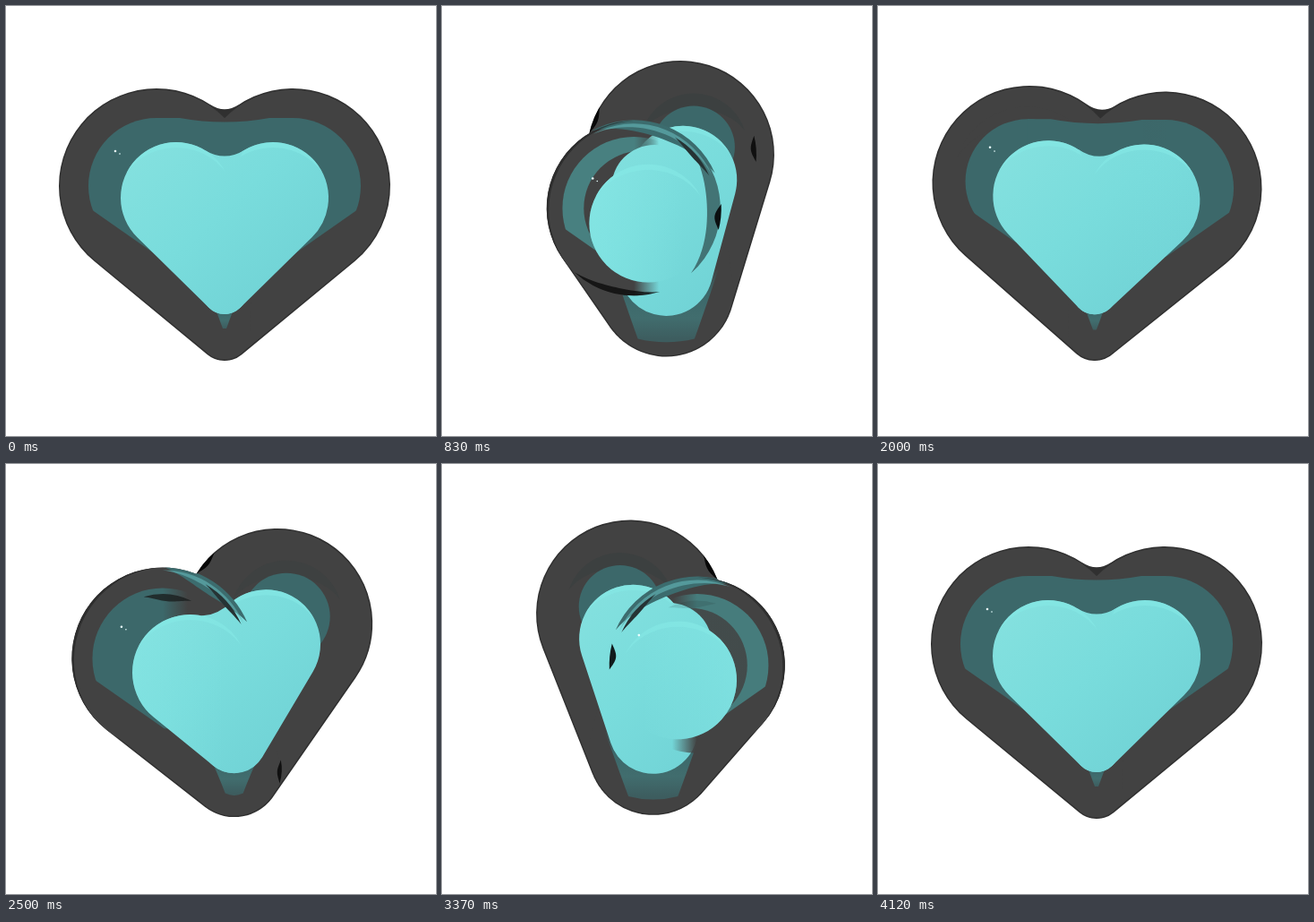
Animation, 480 px wide and 480 px high, one loop 4220 ms. Source, as an HTML page with a canvas:

```html
<!DOCTYPE html>
<html lang="en">
<head>
<meta charset="utf-8">
<title>Turning glass heart</title>
<style>
html, body { margin: 0; width: 100%; height: 100%; overflow: hidden; background: #fff; }
canvas { display: block; width: 480px; height: 480px; }
</style>
</head>
<body>
<canvas id="stage" width="480" height="480"></canvas>
<script>
const ctx = document.getElementById('stage').getContext('2d');
const LOOP = 4220, STEPS = 99, MID = 244, TAU = Math.PI * 2;
const SHELL = '66,66,66', TEAL = '60,104,106';

const clamp = (v, a = 0, b = 1) => Math.min(b, Math.max(a, v));
const smooth = (a, b, v) => { const k = clamp((v - a) / (b - a)); return k * k * (3 - 2 * k); };
const lerp = (a, b, k) => a + (b - a) * k;
const disc = (x, y, r) => ({ x, y, r });
const shrink = (c, d) => disc(c.x, c.y, c.r - d);

function circle(c) {
  const p = new Path2D();
  p.arc(c.x, c.y, c.r, 0, TAU);
  return p;
}

// Outline wrapped tightly round two circles
function hull(a, b) {
  const d = Math.hypot(b.x - a.x, b.y - a.y);
  if (d <= Math.abs(a.r - b.r) + 0.01) return circle(a.r > b.r ? a : b);
  const dir = Math.atan2(b.y - a.y, b.x - a.x);
  const off = Math.acos((a.r - b.r) / d);
  const p = new Path2D();
  p.arc(a.x, a.y, a.r, dir + off, dir - off + TAU);
  p.arc(b.x, b.y, b.r, dir - off, dir + off);
  p.closePath();
  return p;
}

// Upper crossing point of two circles
function crossing(a, b) {
  const dx = b.x - a.x, dy = b.y - a.y, d = Math.hypot(dx, dy);
  const k = (a.r * a.r - b.r * b.r + d * d) / (2 * d);
  const h = Math.sqrt(Math.max(0, a.r * a.r - k * k));
  const side = dx > 0 ? 1 : -1;
  return { x: a.x + (k * dx + side * h * dy) / d, y: a.y + (k * dy - side * h * dx) / d };
}

// Soft notch between two lobes
function fillet(a, b, d) {
  const [l, r] = a.x < b.x ? [a, b] : [b, a];
  const p = crossing(l, r);
  const on = (c, x) => {
    const u = x - c.x, h = Math.sqrt(Math.max(1, c.r * c.r - u * u));
    return { y: c.y - h, slope: u / h };
  };
  const pl = on(l, p.x - d), pr = on(r, p.x + d);
  const cy = (pl.y + clamp(pl.slope, -1, 1) * d + pr.y - clamp(pr.slope, -1, 1) * d) / 2;
  const path = new Path2D();
  path.moveTo(p.x - d, pl.y);
  path.quadraticCurveTo(p.x, cy, p.x + d, pr.y);
  path.lineTo(p.x, p.y + 14);
  path.closePath();
  return path;
}

// Tapered sliver along the inside of a circle
function sliver(c, r, a0, a1, w, color, alpha = 1) {
  if (alpha <= 0.01) return;
  ctx.beginPath();
  ctx.arc(c.x, c.y, r, a0, a1, a1 < a0);
  for (let i = 0; i <= 24; i++) {
    const k = i / 24, a = lerp(a1, a0, k), q = r - w * Math.sin(Math.PI * k);
    ctx.lineTo(c.x + q * Math.cos(a), c.y + q * Math.sin(a));
  }
  ctx.globalAlpha = alpha;
  ctx.fillStyle = color;
  ctx.fill();
  ctx.globalAlpha = 1;
}

function sideFade(x, rgb, left, right, reach = 28) {
  const g = ctx.createLinearGradient(x - reach, 0, x + reach, 0);
  g.addColorStop(0, `rgba(${rgb},${left})`);
  g.addColorStop(0.5, `rgba(${rgb},1)`);
  g.addColorStop(1, `rgba(${rgb},${right})`);
  return g;
}

function tealDisc(c, lobe, tilt, fill) {
  ctx.save();
  ctx.beginPath();
  ctx.moveTo(lobe.x - 120, lobe.y + 77 - 84 * tilt);
  ctx.lineTo(lobe.x + 120, lobe.y + 77 + 84 * tilt);
  ctx.lineTo(lobe.x + 120, 0);
  ctx.lineTo(lobe.x - 120, 0);
  ctx.clip();
  ctx.fillStyle = fill;
  ctx.fill(circle(c));
  ctx.restore();
}

function bottomGlow(x, s) {
  const w = 13 + 50 * s * s, b = 2 + 34 * s ** 3;
  const top = 330 - 40 * s * s, y = 360 + 12 * s;
  const g = ctx.createLinearGradient(0, top, 0, y);
  g.addColorStop(0, `rgba(${TEAL},0)`);
  g.addColorStop(0.35, `rgb(${TEAL})`);
  g.addColorStop(0.7, '#416d6e');
  g.addColorStop(1, '#3d5d5f');
  ctx.fillStyle = g;
  ctx.beginPath();
  ctx.moveTo(x - w, top);
  ctx.lineTo(x + w, top);
  ctx.quadraticCurveTo(x + b + 6, y - 16, x + b, y);
  ctx.quadraticCurveTo(x, y + 8 * s, x - b, y);
  ctx.quadraticCurveTo(x - b - 6, y - 16, x - w, top);
  ctx.fill();
}

// Tinted strip joining the two lobes
function bridge(a, b) {
  const [l, r] = a.x < b.x ? [a, b] : [b, a];
  const ly = l.y - l.r, ry = r.y - r.r;
  ctx.fillStyle = `rgb(${TEAL})`;
  ctx.beginPath();
  ctx.moveTo(l.x, ly);
  ctx.lineTo(l.x + 26, ly);
  ctx.quadraticCurveTo((l.x + r.x) / 2, (ly + ry) / 2 + 9, r.x - 26, ry);
  ctx.lineTo(r.x, ry);
  ctx.lineTo(r.x, r.y);
  ctx.lineTo(l.x, l.y);
  ctx.fill();
}

function dot(x, y, r) {
  ctx.fillStyle = '#e9ffff';
  ctx.fill(circle(disc(x, y, r)));
}

function draw(angle) {
  const c = Math.cos(angle), s = Math.abs(Math.sin(angle)), sway = Math.sin(2 * angle);
  const m = clamp(c / 0.2, -1, 1), side = c >= 0 ? -1 : 1;
  const inL = m >= 0 ? 1 : 1 + m, inR = m <= 0 ? 1 : 1 - m;
  const half = 76 * c * (1 + 0.2 * s * s);
  const show = smooth(0.2, 0.6, s), near = smooth(0.91, 0.97, s);

  const front = disc(MID - half * (1 + 0.12 * s), 201 + 26 * s, 109 - 12 * s);
  const back = disc(MID + half * (1 - 0.12 * s) - 1.5 * s * s, 201 - 37 * s, 109 - 4.5 * s);
  const footR = 30 + 50 * s ** 1.6;
  const foot = disc(MID + 11 * sway, 396 - 5 * s * s - footR, footR);

  const coreFront = disc(MID - 54 * c * (1 - 0.15 * s), 214 + 30 * s, 62 + 4 * s);
  const coreBack = disc(MID + 54 * c - side * 10 * s * s * Math.abs(m), 214 - 21 * s, 62 - 2 * s);
  const coreR = 25 + 30 * s * s;
  const coreFoot = disc(MID + 11 * sway, 344 + 2 * s - coreR, coreR);

  ctx.fillStyle = '#fff';
  ctx.fillRect(0, 0, 480, 480);

  // Glass body with a thin dark rim
  const body = new Path2D();
  body.addPath(hull(back, foot));
  body.addPath(hull(front, foot));
  if (s < 0.5) body.addPath(fillet(front, back, 16));
  ctx.save();
  ctx.clip(body);
  ctx.fillStyle = '#303030';
  ctx.fillRect(0, 0, 480, 480);
  ctx.fillStyle = `rgb(${SHELL})`;
  ctx.fill(hull(shrink(back, 1.5), shrink(foot, 1.5)));
  ctx.fill(hull(shrink(front, 1.5), shrink(foot, 1.5)));
  if (s > 0.3) {
    const p = crossing(front, back);
    const a = Math.atan2(p.y - back.y, p.x - back.x);
    sliver(back, back.r, a, a - side * 0.3, 5, '#080808', smooth(0.3, 0.6, s));
  }
  const far = side < 0 ? 0 : Math.PI;
  sliver(foot, foot.r, far - 0.2, far + 0.3, 5, '#101010', show * (1 - smooth(0.82, 0.9, s)));
  sliver(back, back.r - 20, far - 0.25, far + 0.1, 6, '#080808', near);

  // Tinted interior
  const backX = MID + 76 * c - side * 15 * s * Math.abs(m);
  const backTeal = disc(backX, 201 - 57 * s + 12 * s * s, 46 + 30 * (1 - s) ** 2.5);
  const frontTeal = disc(front.x, front.y, 76 + 4 * s);
  sliver(backTeal, backTeal.r + 14, Math.PI * 1.1, Math.PI * 1.9, 18, '#393f40', 0.7 * s);
  tealDisc(backTeal, back, -m, `rgb(${TEAL})`);
  bottomGlow(foot.x, s);
  ctx.globalAlpha = 1 - smooth(0.15, 0.55, s);
  bridge(frontTeal, backTeal);
  ctx.globalAlpha = 1;

  // Rear part of the bright core
  const glow = ctx.createLinearGradient(140, 150, 310, 340);
  glow.addColorStop(0, '#85e1df');
  glow.addColorStop(0.5, '#79dcdc');
  glow.addColorStop(1, '#70d2d5');
  ctx.fillStyle = glow;
  ctx.fill(hull(coreBack, coreFoot));
  sliver(coreBack, coreBack.r, Math.PI * 1.15, Math.PI * 1.85, 6, '#86e9e6', 0.6);

  // Front lobe wall
  ctx.globalAlpha = smooth(0.05, 0.4, s);
  ctx.fillStyle = sideFade(front.x, SHELL, inL, inR);
  ctx.fill(circle(front));
  ctx.globalAlpha = 1;
  const shade = smooth(0.82, 0.94, s);
  const lit = `${60 + 12 * shade},${104 + 24 * shade},${106 + 22 * shade}`;
  tealDisc(frontTeal, front, m, sideFade(front.x, lit, inL, inR));
  ctx.globalAlpha = shade;
  ctx.fillStyle = sideFade(front.x, SHELL, inL, inR);
  ctx.fill(circle(disc(front.x + 8 * m, front.y, 64)));
  ctx.globalAlpha = 1;

  // Front part of the bright core, with the rear lobe peeking over it
  const cap = smooth(0.5, 0.9, s);
  ctx.fillStyle = glow;
  ctx.fill(circle(disc(lerp(coreFront.x, MID, 0.5), 203, 48 * cap)));
  const reach = 1 - smooth(0.6, 0.93, s);
  const tail = disc(
    lerp(coreFront.x, coreFoot.x, reach),
    lerp(coreFront.y, coreFoot.y, reach),
    lerp(coreFront.r, coreFoot.r, reach)
  );
  const frontCore = hull(coreFront, tail);
  ctx.fill(frontCore);
  if (s < 0.75) ctx.fill(fillet(coreFront, coreBack, 22 - 8 * s));
  const tint = ctx.createLinearGradient(coreFront.x + side * 62, 0, coreFront.x - side * 40, 0);
  tint.addColorStop(0, `rgba(136,234,232,${0.5 * s})`);
  tint.addColorStop(1, 'rgba(136,234,232,0)');
  ctx.fillStyle = tint;
  ctx.fill(frontCore);
  sliver(coreFront, coreFront.r, Math.PI * 1.15, Math.PI * 1.85, 6, '#86e9e6', 0.6);

  // Streaks where the near lobe bends the light
  const inner = side > 0 ? Math.PI * 1.13 : Math.PI * 1.87;
  const top = Math.PI * 1.5;
  const edge = side > 0 ? Math.PI : 0;
  sliver(front, front.r - 1, edge - 0.95, edge + 0.85, 15, '#3a6263', near);
  sliver(front, front.r + 1, inner, top + side * 0.5 * shade, 15, '#3c6c6e', show);
  sliver(front, front.r - 3, inner, top + side * 0.5 * shade, 5, '#5fadae', 0.7 * show);
  sliver(front, front.r - 6, inner, lerp(inner, top, 0.55), 5, '#263334', show);
  sliver(front, 72, lerp(inner, top, 0.6), top + side * 0.3, 8, '#1b1f1f', 0.8 * show * (1 - shade));
  sliver(front, front.r, edge - 0.05, edge + 0.25, 7, '#0b0f10', smooth(0.85, 0.92, s));
  sliver(front, front.r, Math.PI / 2 - side * 0.75, Math.PI / 2 + side * 0.3, 7, '#080808', 0.9 * near);
  sliver(front, front.r, side < 0 ? Math.PI * 0.75 : Math.PI * 0.25, side < 0 ? Math.PI * 1.5 : -Math.PI * 0.5, 3, '#262626', 0.7 * show);

  // Highlights
  if (c > 0 || s > 0.6) {
    const x = front.x - 46 - (c < 0 ? 19 : 0), y = front.y - 39 + 6 * s;
    dot(x, y, 1.3);
    if (c > 0) dot(x + 5, y + 3, 0.8);
  }
  if (c < 0 && s < 0.86) {
    dot(back.x - 44, back.y - 41 + 14 * s, 1.3);
    dot(back.x - 39, back.y - 37 + 17 * s, 0.8);
  }
  ctx.restore();
}

const start = performance.now();

function tick() {
  const t = (performance.now() - start) % LOOP;
  // 24 pictures a second, with starts rounded down to 10 ms
  const step = Math.min(STEPS, Math.ceil((Math.floor(t / 10) + 1) * 0.24) - 1);
  const turn = (step / STEPS * 2) % 1;
  draw(turn * Math.PI);
  requestAnimationFrame(tick);
}
tick();
</script>
</body>
</html>
```
